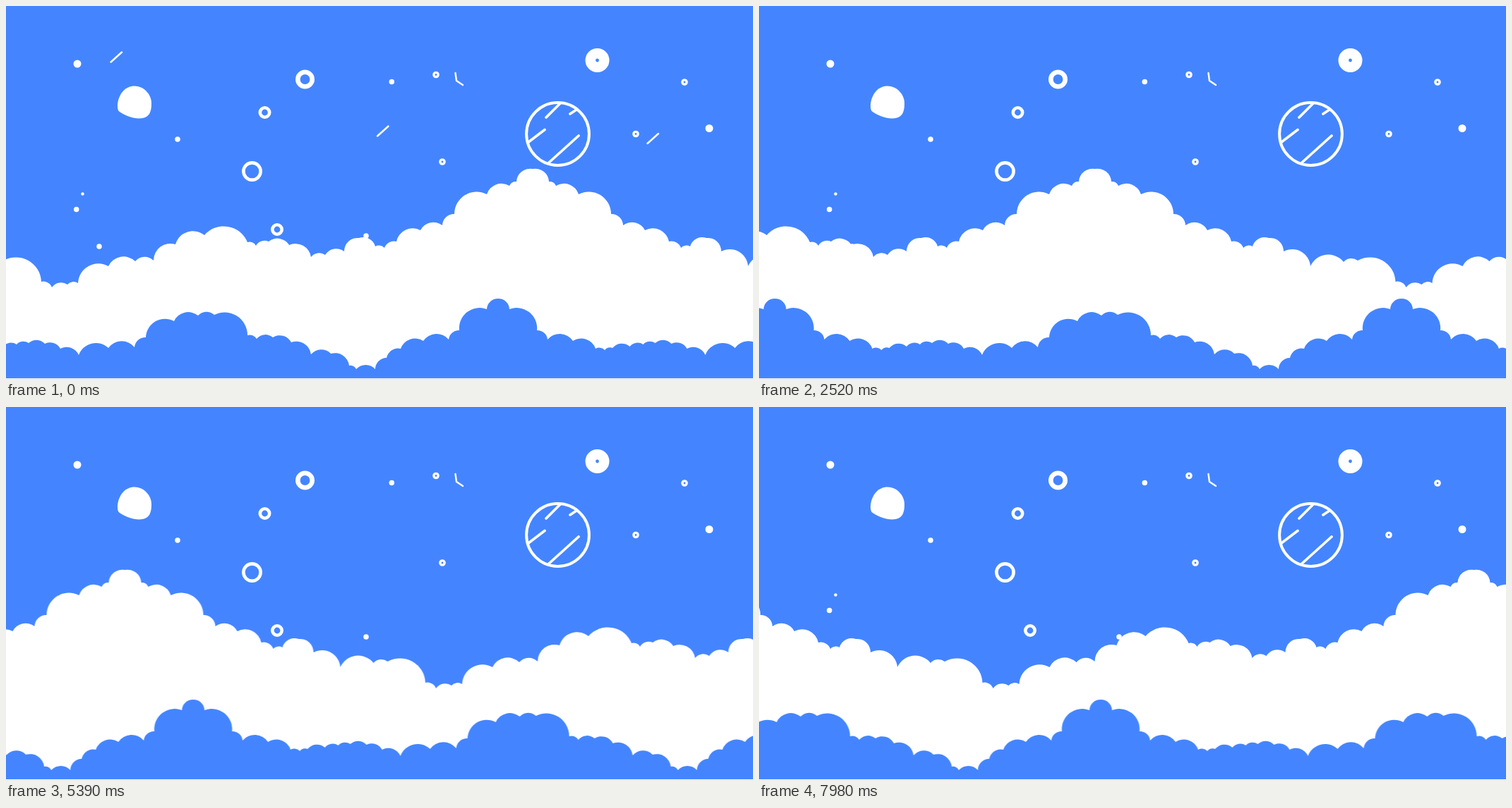
An HTML page that plays this animation: 1058x529 px, repeating every 8 s.

```html
<!DOCTYPE html>
<html lang="en">
<head>
<meta charset="utf-8">
<title>Sky</title>
<style>
  html, body { margin: 0; width: 100%; height: 100%; overflow: hidden; background: #fff; }
  svg { display: block; width: 100vw; height: 100vh; }
  .sky { fill: #4485ff; }
  .white { fill: #fff; }
  .line { fill: none; stroke: #fff; stroke-linecap: round; stroke-linejoin: round; }

  /* 114 ticks of 70 ms, then a short hold */
  .drift { animation: drift 8s infinite; }
  @keyframes drift {
    0% { transform: translate(0, 0); animation-timing-function: steps(114); }
    99.75%, 100% { transform: translate(var(--dx), var(--dy, 0px)); }
  }
  .meteors { --dx: -525px; --dy: 582.5px; }
  .back { --dx: -855px; }
  .front { --dx: 674.5px; }
</style>
</head>
<body>
<svg viewBox="0 0 1058 529">
  <defs>
    <path id="eyes" d="M609 97.500h0M961 108h0M892 181.500h0M618 221h0"/>
    <path id="meteor" d="M0 0l15.500-14"/>
  </defs>
  <rect class="sky" width="1058" height="528"/>

  <!-- stars -->
  <g class="line">
    <path stroke-width="7.500" d="M243 189h0M99.700 288.500h0M132 341h0M546.300 107.500h0M510 326h0"/>
    <path stroke-width="11" d="M101 82h0M996 173.500h0"/>
    <path stroke-width="4.400" d="M108.500 266.500h0"/>
    <path stroke-width="2.400" d="M636.500 95L638 106L647 112"/>
    <use href="#eyes" stroke-width="9.600"/>
    <use href="#eyes" style="stroke:#4485ff" stroke-width="2.800"/>
  </g>

  <!-- rings -->
  <g class="line" stroke-width="4.600">
    <circle cx="366.500" cy="151" r="6.700"/>
    <circle cx="384" cy="317" r="6.700"/>
    <circle cx="348.500" cy="234.500" r="12.100"/>
    <circle cx="423.500" cy="104" r="10.200" stroke-width="6.600"/>
    <circle cx="837.500" cy="77" r="9.700" stroke-width="14.600"/>
  </g>

  <!-- moon and planet -->
  <path class="white" d="M158 139C160 124 169 113.500 182 113.500C195 113.500 206 125 206 138C206 152 202 159 189 159.500C177 159.500 164 153 159.500 149Q157.500 146 158 139Z"/>
  <g class="line" stroke-width="4">
    <circle cx="781.500" cy="181.500" r="44.400"/>
    <path stroke-width="3.700" d="M765 158L784 139M799 153L808 147M740 193L763 175.500M769 222L811 184"/>
  </g>

  <g class="drift meteors line" stroke-width="2.500">
    <use href="#meteor" x="148.500" y="79.500"/>
    <use href="#meteor" x="526" y="184.500"/>
    <use href="#meteor" x="908.500" y="195"/>
  </g>
  <g class="drift back white" id="back"></g>
  <g class="drift front sky" id="front"></g>
  <rect class="white" y="528" width="1058" height="1"/>
</svg>

<script>
  // A symmetric mountain: half its outline, as distance from the axis and height.
  const mountain = (axis, half) => [
    ...half.slice(1).reverse().map(([dx, y]) => [axis - dx, y]),
    ...half.map(([dx, y]) => [axis + dx, y])
  ];

  // Round puffs between the notches of a ridge; wider puffs are fuller.
  function puffs(ridge, period) {
    const [endX, endY] = ridge[ridge.length - 1];
    const left = endX - period;
    let [px, py] = [left, endY];
    let d = `M${px} ${py}`;
    for (const [x, y] of ridge) {
      const chord = Math.hypot(x - px, y - py);
      const bulge = chord * Math.min(0.28, 0.14 + 0.003 * chord);
      const r = chord * chord / (8 * bulge) + bulge / 2;
      d += `A${r} ${r} 0 0 1 ${x} ${y}`;
      [px, py] = [x, y];
    }
    return `${d}l4 2V530H${left}Z`;
  }

  function drawCloud(id, period, ridge) {
    const d = puffs(ridge, period);
    document.getElementById(id).innerHTML = [-1, 0, 1]
      .map(i => `<path d="${d}" transform="translate(${i * period})"/>`).join('');
  }

  drawCloud('back', 1121.5, [
    [50, 391], [65, 399], [87, 395], [102, 393], [145, 369], [183, 362], [209, 361],
    [240, 338], [281, 325], [342, 335], [354, 340], [372, 334], [401, 339], [432, 356], [452, 353],
    ...mountain(746, [
      [0, 231], [23, 249], [33, 255], [65, 267], [111, 295], [128, 311], [159, 318],
      [193, 334], [210, 343], [223, 341], [246, 329], [267, 348]
    ]),
    [1051, 369], [1098, 363], [1118, 361]
  ]);

  drawCloud('front', 887.5, [
    [15, 480], [32, 478], [55, 479], [77, 486], [103, 495], [145, 485], [182, 484],
    [198, 470], [238, 447], [272, 439], [295, 438], [342, 467], [355, 472], [378, 470],
    [404, 477], [432, 494], [460, 493], [486, 510], [496, 515], [523, 515], [539, 499],
    ...mountain(697, [[0, 415], [16, 430], [55, 460], [70, 473], [106, 475], [138, 486]]),
    [848, 488], [859, 485], [883.5, 483]
  ]);
</script>
</body>
</html>
```
